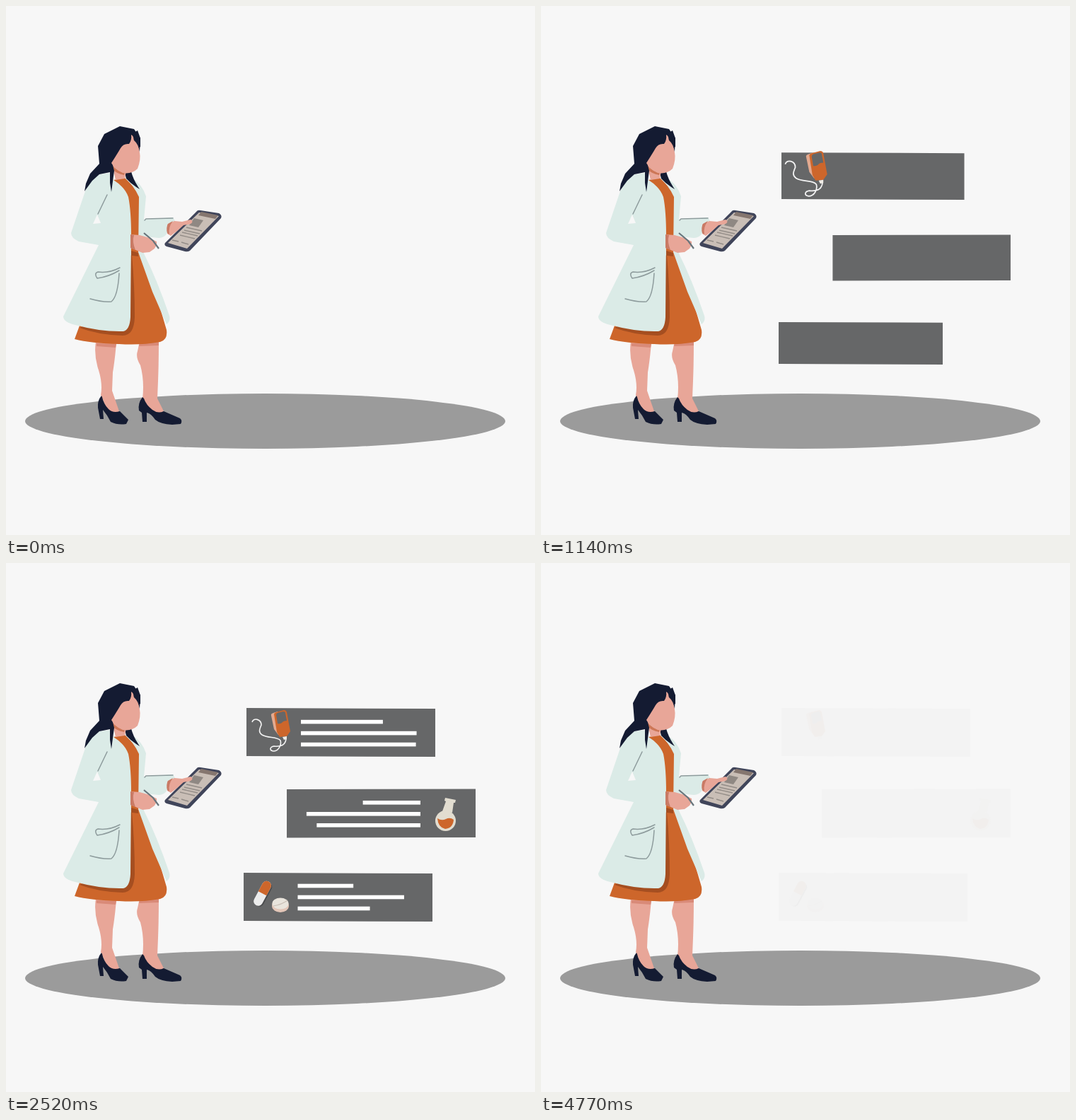
Recreate the animation shown at these times as an HTML page. Size 748 by 748 pixels, loop 4830 ms.

```html
<!DOCTYPE html>
<html lang="en">
<head>
<meta charset="utf-8">
<title>Medical notes</title>
<style>
  html, body { margin: 0; width: 100%; height: 100%; overflow: hidden; background: #f7f7f7; }
  svg { display: block; width: 100%; height: 100%; }
  .navy { fill: #141b32; }
  .skin { fill: #e8a698; }
  .coat { fill: #dbebe7; }
  .orange { fill: #cd662b; }
  .rust { fill: #a54e20; }
  .bar { fill: #666768; }
  .fold { fill: none; stroke: #8d9b9c; stroke-width: 1.5; stroke-linecap: round; }
</style>
</head>
<body>
<svg viewBox="0 0 748 748">
  <ellipse cx="366.5" cy="587" rx="339.5" ry="39" fill="#9b9b9b"/>

  <g id="doctor">
    <!-- legs and shoes -->
    <path class="skin" d="M127 474 L156 476 Q154 500 151 518 L150 544 L160 573 Q150 580 141 566 L134 550 Q137 535 131 515 Q124 495 127 474Z"/>
    <path class="skin" d="M189 474 L216 473 Q216 505 215 530 L214 555 L223 573 Q210 580 200 568 L193 556 Q196 530 190 508 Q183 497 186 488Z"/>
    <path fill="#d98a78" d="M128 477 L156 478 L155 483 L128 481Z M189 477 L216 474 L216 480 L188 481Z"/>
    <path class="navy" d="M135 551 Q129 558 130 568 L133 584 L138 584 L137 571 Q143 578 148 588 Q158 593 170 591 L173 585 L161 573 Q151 576 145 570 Q138 563 136 553Z"/>
    <path class="navy" d="M193 553 Q186 562 188 572 L192 575 L193 588 L199 588 L199 575 Q205 576 211 585 Q218 591 235 592 L247 591 Q250 586 246 583 L223 573 Q215 577 207 571 Q198 564 195 555Z"/>

    <!-- dress -->
    <path class="orange" d="M152 246 L168 243 L185 260 L189 268 L189 350 Q207 388 227 458 Q229 472 218 475 Q190 480 160 478 Q120 477 97 471 L104 452 L177 352 L172 270Z"/>
    <path class="rust" d="M177 346 L187 349 L187 354 L178 353 Q182 395 182 440 Q181 466 165 466 Q130 465 104 455 L140 440 L174 440Z"/>

    <!-- coat -->
    <path class="coat" d="M168 242 L182 246 Q193 254 198 269 L195 302 L236 299 L239 304 L229 309 L228 321 Q224 328 216 328 L196 326 L195 350 Q214 388 231 438 Q233 446 227 450 L207 404 L187 348 L188 270 Q182 256 168 242Z"/>
    <path class="coat" d="M148 236 L152 246 Q168 256 173 270 Q177 290 177 325 L176 440 Q175 458 166 460 Q135 461 98 451 Q81 447 81 439 L131 338 L103 333 Q92 328 92 321 L112 262 Q118 246 132 238Z"/>
    <path fill="#f7f7f7" d="M129 295 L134 307 L123 308Z"/>
    <path class="fold" d="M143 267 L130 294"/>
    <path class="fold" d="M161 370 Q146 378 130 376 Q124 378 129 385 Q145 383 160 374 M119 414 Q136 419 149 418 Q158 411 160 378"/>
    <path class="fold" d="M196 303 L198 301 L236 300"/>

    <!-- head -->
    <path class="navy" d="M168 236 L177 234 Q180 246 189 259 Q177 252 170 244Z"/>
    <path class="skin" d="M150 224 L170 233 L168 244 L155 246Z"/>
    <path fill="#cd7757" d="M150 225 Q158 235 168 235 L167 239 Q156 237 151 231Z"/>
    <path class="navy" d="M161 170 L181 174 L190 187 L190 199 L150 221 L153 233 L149 263 L147 250 L147 235 L132 238 L122 247 L111 262 L113 251 L119 237 L132 223 L130 198 L139 181Z"/>
    <path class="skin" d="M149 222 Q158 208 162 201 Q166 194 174 195 Q178 190 177 182 Q181 184 181 190 L186 189 Q188 202 189 207 Q191 217 186 230 Q178 238 165 236 Q154 231 149 222Z"/>
    <path class="navy" d="M178 181 L186 176 L190 187 L189 206 Q187 195 181 190 Q181 185 178 181Z"/>

    <!-- tablet and hands -->
    <path fill="#40455a" d="M269 291 Q271 288 275 289 L301 293 Q306 296 304 300 L260 346 Q257 348 253 347 L227 340 Q223 338 225 335Z"/>
    <path fill="#c9beb6" d="M273 292 L301 297 L256 343 L229 335Z"/>
    <path fill="#85766f" d="M276 291 L300 296 L296 301 L272 296Z"/>
    <path fill="#8f8883" d="M266 300 L279 303 L272 313 L259 310Z"/>
    <path fill="none" stroke="#938c87" stroke-width="1.4" d="M255 313 L277 318 M252 317 L274 322 M249 320 L271 325 M246 324 L267 329 M235 331 L244 333 M248 334 L258 337"/>
    <path class="skin" d="M228 309 L238 304 L249 305 L261 302 Q266 305 261 308 L251 310 L242 318 L233 325 L228 322Z"/>
    <path fill="#c97a65" d="M229 308 L236 304 Q229 313 231 323 L228 321 Q226 314 229 308Z"/>
    <path class="skin" d="M176 323 L189 324 L200 327 L213 333 Q214 337 210 343 L203 348 L193 349 L176 342Z"/>
    <path fill="#c97a65" d="M176 323 L181 324 Q178 333 183 345 L176 342Z"/>
    <path fill="none" stroke="#68757c" stroke-width="2.2" d="M195 321 L208 332 L216 343"/>
  </g>

  <g id="notes">
    <!-- data-grow and data-pop: pivot x, pivot y, start, time constant or duration -->
    <polygon class="bar" data-grow="340 273.5 505 184" points="340,205 607,206 607,274 340,273"/>
    <polygon class="bar" data-grow="664 388 618 183" points="397,320 664,319.5 664,388 397,388.5"/>
    <polygon class="bar" data-grow="336 506.5 768 183" points="336,438 603,439 603,507 336,506"/>

    <g data-pop="375 238 880 450">
      <path fill="none" stroke="#f4f4f4" stroke-width="1.6" d="M348 225 C350 218 361 221 361 229 C358 236 357 239 362 243 C370 248 384 245 388 251 C390 258 385 266 378 266 C372 265 373 260 379 259 C388 260 396 258 396 247"/>
      <path fill="#e3aa90" d="M375 216 Q374 213 378 212 L384 210 L389 244 L385 243 L379 235Z"/>
      <path class="orange" d="M379 214 Q379 212 382 211 L393 208 Q396 208 397 211 L402 238 L397 245 L387 246 L383 239Z"/>
      <path class="bar" d="M382 215 Q382 213 384 212 L392 210 Q395 210 395 212 L397 223 Q392 223 390 226 Q387 228 384 227Z"/>
      <path fill="#f0ece6" d="M391 246 L397 245 L397 249 L393 250Z"/>
    </g>

    <g data-pop="621 356 1150 430">
      <path fill="#e2ddd0" d="M621 332 L636 335 L635 339 L633 339 L631 353 L617 351 L622 337 L620 336Z"/>
      <circle cx="621.5" cy="364.5" r="14.5" fill="#e2ddd0"/>
      <path class="orange" d="M610 361 Q616 365 622 362 Q628 359 633 363 Q632 375 621 376 Q611 374 610 361Z"/>
    </g>

    <g data-pop="363 467.5 1548 450">
      <g transform="translate(363 467.5) rotate(28)">
        <rect x="-5" y="-18" width="13" height="37" rx="6.5" fill="#4b4c4e"/>
        <rect x="-7" y="-19" width="13" height="38" rx="6.5" fill="#ececec"/>
        <path class="orange" d="M-7 0 V-12.5 A6.5 6.5 0 0 1 6 -12.5 V0Z"/>
      </g>
    </g>
    <g data-pop="388 483.5 1548 450">
      <ellipse cx="388" cy="484.5" rx="12" ry="9.5" fill="#e3c6b8"/>
      <ellipse cx="388" cy="481.5" rx="11.5" ry="8" fill="#e9e4dc"/>
      <path fill="none" stroke="#c9bfb5" stroke-width="1.2" d="M378 485 Q390 483 398 477"/>
    </g>
  </g>
</svg>
<script>
  const LOOP = 4830, STEP = 30;
  const notes = document.getElementById('notes');
  const settle = (t, tau) => t <= 0 ? 0 : 1 - Math.exp(-t / tau);
  const backOut = u => {
    if (u <= 0) return 0;
    const v = Math.min(u, 1) - 1;
    return 1 + 2.70158 * v ** 3 + 1.70158 * v * v;
  };

  // Text lines: fixed end x, signed widths, first y, first start, time constant
  const blocks = [
    [417, [116, 164, 164], 221.8, 1363, 163],
    [586, [-82, -164, -153], 336, 1420, 225],
    [412.5, [81.5, 164, 127], 453.7, 1775, 222]
  ];
  for (const [x, widths, y, start, tau] of blocks) {
    widths.forEach((w, i) => {
      const line = document.createElementNS('http://www.w3.org/2000/svg', 'rect');
      const attrs = { x: Math.min(x, x + w), y: y + i * 16, width: Math.abs(w), height: 5.6, fill: '#fff' };
      for (const name in attrs) line.setAttribute(name, attrs[name]);
      line.dataset.write = [x, y, start + i * 192, tau].join(' ');
      notes.append(line);
    });
  }

  const parts = ['grow', 'pop', 'write'].flatMap(kind =>
    [...notes.querySelectorAll(`[data-${kind}]`)].map(el =>
      ({ el, kind, spec: el.dataset[kind].split(' ').map(Number) })));

  function draw(t) {
    // Every part fades on its own, so the bars show through what lies on them
    const opacity = Math.max(0.026, Math.min(1, (4800 - t) / 1160));
    for (const { el, kind, spec: [x, y, start, span] } of parts) {
      const s = kind === 'pop' ? backOut((t - start) / span) : settle(t - start, span);
      const sy = kind === 'write' ? 1 : s;
      el.setAttribute('transform', `translate(${x} ${y}) scale(${s} ${sy}) translate(${-x} ${-y})`);
      el.style.visibility = s > 0 ? 'visible' : 'hidden';
      el.style.opacity = opacity;
    }
  }

  const origin = performance.now();
  function tick() {
    const t = (performance.now() - origin) % LOOP;
    draw(t - t % STEP);
    requestAnimationFrame(tick);
  }
  tick();
</script>
</body>
</html>
```
